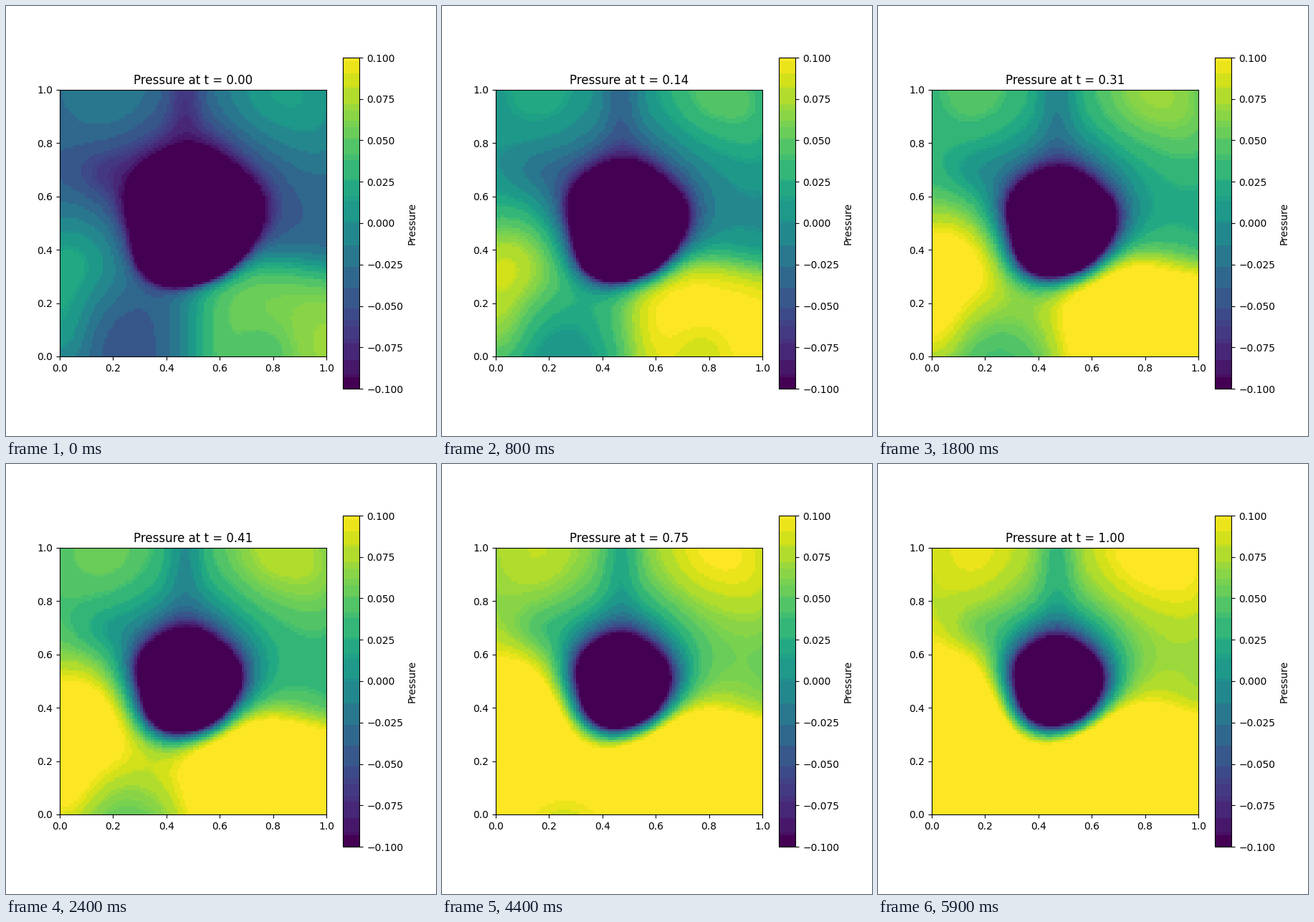
Animation, 600 px wide and 600 px high, one loop 6 s. Source, as a matplotlib script:

```python
import numpy as np
import matplotlib.pyplot as plt
from matplotlib.animation import FuncAnimation
from matplotlib.colors import ListedColormap

FRAMES = 60
CELLS = 100
LOW = -0.1

axis = np.linspace(0, 1, CELLS)
X, Y = np.meshgrid(axis, axis)

# Soft hills and hollows around the well: x, y, width, height, pressure
BUMPS = [(0.03, 0.35, 0.17, 0.14, 0.058),
         (0.00, 0.08, 0.08, 0.13, 0.040),
         (0.17, 1.00, 0.14, 0.13, 0.027),
         (0.82, 1.00, 0.17, 0.17, 0.054),
         (1.00, 0.85, 0.10, 0.15, 0.016),
         (0.47, 1.00, 0.05, 0.25, -0.036),
         (0.17, 0.69, 0.09, 0.07, -0.024),
         (0.25, 0.08, 0.10, 0.15, -0.012),
         (0.77, 0.00, 0.08, 0.08, -0.018),
         (1.00, 0.05, 0.12, 0.12, 0.010)]

# Waves around the rim of the well: order, amplitude, phase in degrees
WAVES = [(1, 0.0024, 232), (2, 0.0040, 125), (3, 0.0143, 17),
         (4, 0.0045, -76), (5, 0.0063, 72)]


def bump(x, y, width, height, pressure):
    return pressure * np.exp(-((X - x) / width) ** 2 / 2 - ((Y - y) / height) ** 2 / 2)


def step(v):
    return 1 / (1 + np.exp(-v))


def banded_viridis():
    """Viridis cut to 3, 4 and 3 bits for red, green and blue."""
    lut = plt.get_cmap("viridis")(np.arange(256), bytes=True)[:, :3].astype(int)
    keys = (lut // [32, 16, 32]) @ np.array([256, 16, 1])
    colors = np.array([lut[keys == k].mean(axis=0) for k in keys])
    colors[keys == keys[0]] = lut[0]
    colors[keys == keys[-1]] = lut[-1]
    return ListedColormap(colors / 255)


def progress(t, rate=8):
    return np.log1p(rate * t) / np.log1p(rate)


# A warm plateau fills the lower right corner.
plateau = 0.1 * step((X - 0.5) / 0.055) * step((0.335 + 0.16 * (1 - X) - Y) / 0.04)
base = -0.04 + plateau + sum(bump(*b) for b in BUMPS)
growth = 0.11 - 0.015 * X + bump(0.3, 0.3, 0.38, 0.25, 0.1)


def pressure(t):
    g = progress(t)
    shrink = g ** 0.85
    dx = X - (0.493 - 0.023 * g)
    dy = Y - (0.53 - 0.03 * np.sqrt(shrink))
    angle = np.arctan2(dy, dx)

    ripple = sum(a * np.cos(k * angle - np.radians(p)) for k, a, p in WAVES)
    rim = 0.263 - 0.097 * shrink + (1 - 0.65 * shrink) * ripple
    outside = np.maximum(np.hypot(dx, dy) - rim, 0)

    wall = 0.045 + 0.03 * g + (0.025 - 0.008 * g) * np.sin(angle)
    field = base + g * growth
    return field - (field - LOW) * np.exp(-outside / wall)


fig, ax = plt.subplots(figsize=(6, 6), dpi=100)
image = ax.imshow(pressure(0), origin="lower", extent=(0, 1, 0, 1), cmap=banded_viridis(),
                  vmin=LOW, vmax=-LOW, interpolation="nearest")
fig.colorbar(image, ax=ax, label="Pressure")
title = ax.set_title("Pressure at t = 0.00")


def update(i):
    t = i / (FRAMES - 1)
    image.set_data(pressure(t))
    title.set_text(f"Pressure at t = {t:.2f}")
    return image, title


anim = FuncAnimation(fig, update, frames=FRAMES, interval=100, repeat=True, repeat_delay=0)
plt.show()
```
